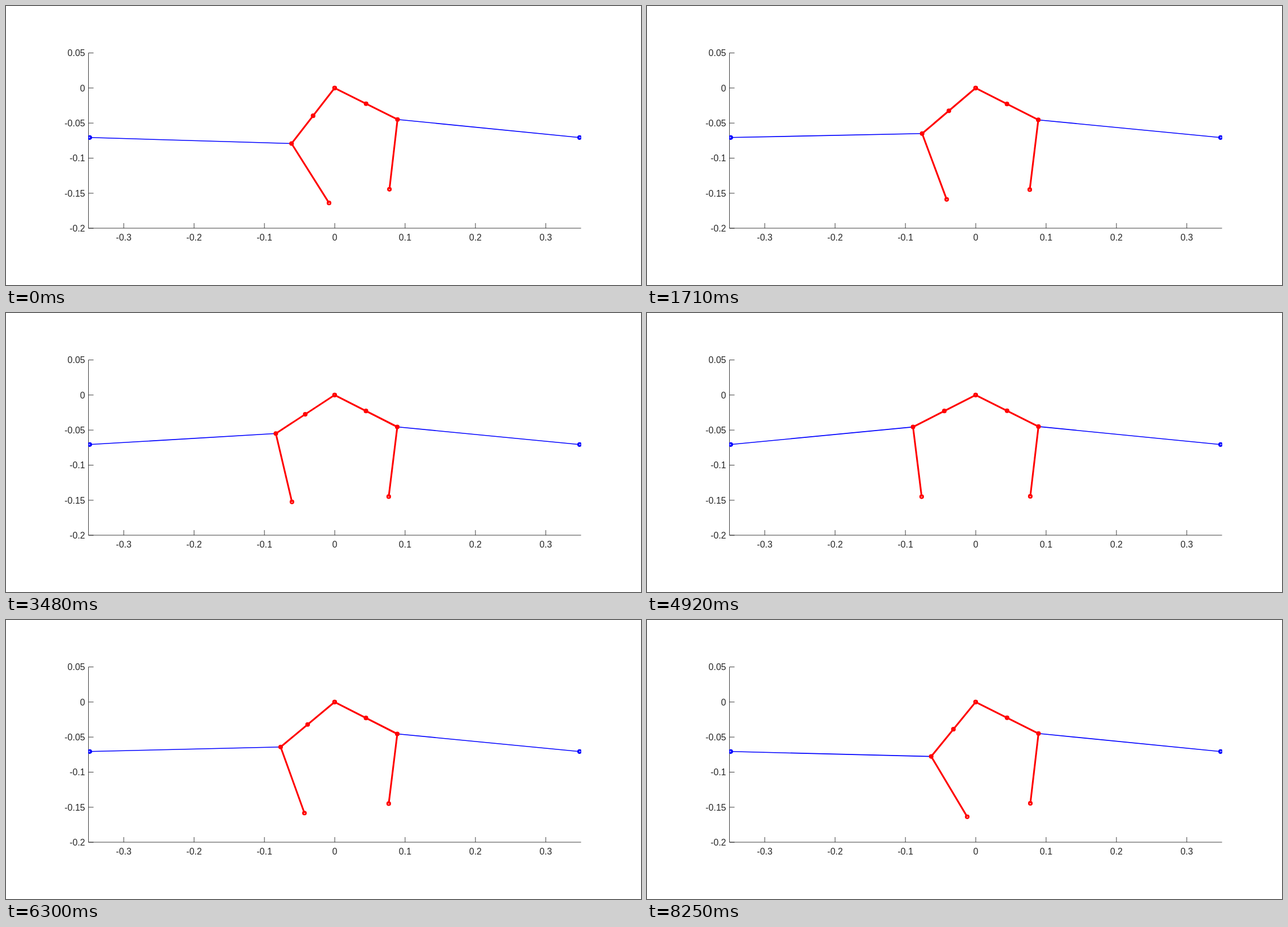
Animation of 1128x496 px, one loop 8280 ms. Source, as an HTML page:

```html
<!DOCTYPE html>
<html lang="en">
<head>
<meta charset="utf-8">
<title>Two-leg linkage</title>
<style>
  html, body { margin: 0; width: 100%; height: 100%; overflow: hidden; background: #fff; }
  svg { display: block; width: 1128px; height: 496px; }
  text { font: 16px "Liberation Sans", Arial, sans-serif; fill: #262626; }
  .axis { fill: none; stroke: #262626; stroke-width: 0.9; }
  .leg { fill: none; stroke: #f00; stroke-width: 3.1; stroke-linejoin: round; }
  .spring { fill: none; stroke: #00f; stroke-width: 1.6; }
  circle { fill: none; stroke-width: 2.8; }
  .joint { stroke: #f00; }
  .anchor { stroke: #00f; }
</style>
</head>
<body>
<svg id="stage" viewBox="0 0 1128 496">
  <defs><clipPath id="plot"><rect x="146" y="83" width="875.7" height="312.5"/></clipPath></defs>
</svg>
<script>
const LOOP = 8280, STEP = 30;
const HIP = { x: 583.8, y: 145.8 };
const LIMB = 124.9;      // thigh and shin length in pixels
const KNEE_BEND = 20;    // degrees between thigh slope and shin lean
const ANCHOR_Y = 233.8;

// [time in ms, thigh slope in degrees]
const LEFT = [[0, 52.2], [1020, 41.9], [1680, 40.5], [2580, 38.3], [3480, 33.25],
  [4170, 26.8], [4590, 26.8], [4920, 27.05], [5400, 35.2], [6300, 39.8], [8250, 50.8]];
const RIGHT = [[0, 26.6], [1020, 26.95], [2580, 27], [3480, 27], [4170, 26.65],
  [4590, 26.65], [4920, 26.68], [6300, 27], [7200, 26.95], [8250, 26.65]];

const stage = document.getElementById('stage');

function add(tag, attrs, parent = stage) {
  const el = document.createElementNS('http://www.w3.org/2000/svg', tag);
  set(el, attrs);
  parent.appendChild(el);
  return el;
}

function set(el, attrs) {
  for (const key in attrs) el.setAttribute(key, attrs[key]);
}

// Monotone cubic curve through the keys
function curve(keys) {
  const n = keys.length;
  const rise = keys.slice(1).map((k, i) => (k[1] - keys[i][1]) / (k[0] - keys[i][0]));
  const slope = keys.map((k, i) => {
    if (i === 0) return rise[0] * 1.4;
    if (i === n - 1) return rise[n - 2] * 1.2;
    const a = rise[i - 1], b = rise[i];
    return a * b <= 0 ? 0 : 2 * a * b / (a + b);
  });
  return t => {
    let i = 0;
    while (i < n - 2 && t > keys[i + 1][0]) i++;
    const h = keys[i + 1][0] - keys[i][0];
    const u = Math.min(1, (t - keys[i][0]) / h), v = 1 - u;
    return keys[i][1] * v * v * (1 + 2 * u) + keys[i + 1][1] * u * u * (3 - 2 * u)
      + h * u * v * (slope[i] * v - slope[i + 1] * u);
  };
}

function drawAxes() {
  let d = 'M146.5 83.5V395H1021.5';
  const label = (value, x, y, anchor) => {
    add('text', { x, y, 'text-anchor': anchor }).textContent = String(value);
  };
  for (let i = -3; i <= 3; i++) {
    const x = 584 + i * 124.95;
    d += `M${x} 395v-9`;
    label(i / 10, x, 416.8, 'middle');
  }
  for (let i = -4; i <= 1; i++) {
    const y = 145.8 - i * 62.35;
    d += `M146.5 ${y}h9`;
    label(i / 20, 140.5, y + 5.8, 'end');
  }
  add('path', { d, class: 'axis' });
}

function makeLeg(side, keys, anchorX) {
  const angle = curve(keys);
  const spring = add('path', { class: 'spring' }, plot);
  add('circle', { class: 'anchor', cx: anchorX, cy: ANCHOR_Y, r: 2.7 }, plot);
  const limb = add('path', { class: 'leg' }, plot);
  const joints = [0, 1, 2, 3].map(() => add('circle', { class: 'joint', r: 2.7 }, plot));

  return t => {
    const thigh = angle(t) * Math.PI / 180;
    const shin = thigh - KNEE_BEND * Math.PI / 180;
    const dx = side * LIMB * Math.cos(thigh), dy = LIMB * Math.sin(thigh);
    const knee = { x: HIP.x + dx, y: HIP.y + dy };
    const mid = { x: HIP.x + dx / 2, y: HIP.y + dy / 2 };
    const foot = {
      x: knee.x - side * LIMB * Math.sin(shin),
      y: knee.y + LIMB * Math.cos(shin)
    };
    set(spring, { d: `M${anchorX} ${ANCHOR_Y}L${knee.x} ${knee.y}` });
    set(limb, { d: `M${HIP.x} ${HIP.y}L${knee.x} ${knee.y}L${foot.x} ${foot.y}` });
    [HIP, mid, knee, foot].forEach((p, i) => set(joints[i], { cx: p.x, cy: p.y }));
  };
}

drawAxes();
const plot = add('g', { 'clip-path': 'url(#plot)' });
const legs = [makeLeg(-1, LEFT, 148.7), makeLeg(1, RIGHT, 1018.9)];

function draw(ms) {
  const t = Math.floor((ms % LOOP) / STEP) * STEP;
  legs.forEach(pose => pose(t));
}

const start = performance.now();
function tick() {
  draw(performance.now() - start);
  requestAnimationFrame(tick);
}
tick();
</script>
</body>
</html>
```
